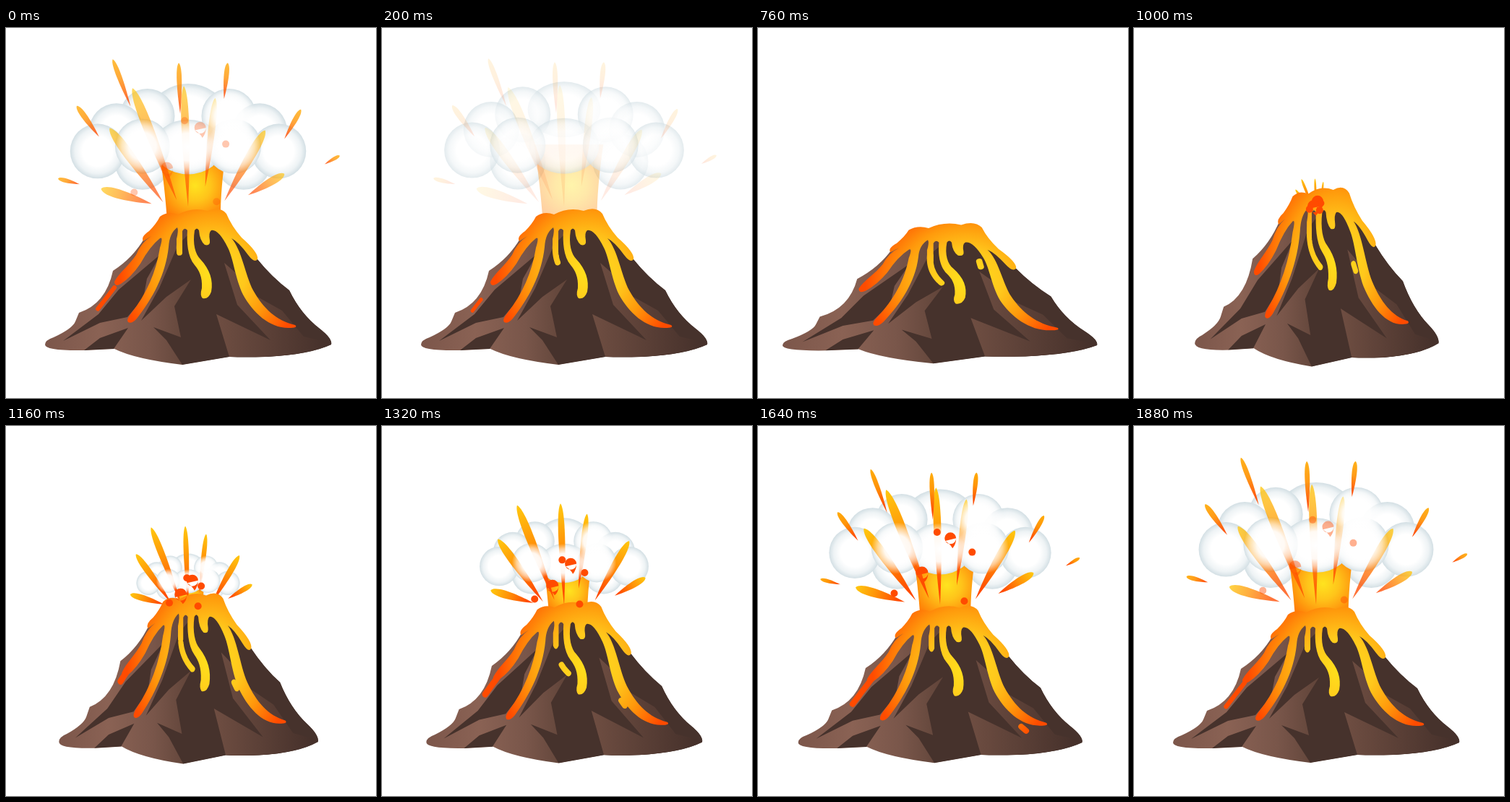
An HTML page with a canvas for the animation above (1920 ms loop, 512x512 px).

```html
<!DOCTYPE html>
<html lang="en">
<head>
<meta charset="utf-8">
<title>Volcano</title>
<style>
html, body { margin: 0; width: 100%; height: 100%; overflow: hidden; background: #fff; }
canvas { display: block; }
</style>
</head>
<body>
<canvas id="stage" width="512" height="512"></canvas>
<script>
const ctx = document.getElementById('stage').getContext('2d');
const LOOP = 1920, STEP = 40;
const CRATER = [252, 254];
const RED = '#ff4b00';

const clamp = v => Math.max(0, Math.min(1, v));
const fade = (t, from, to) => 1 - clamp((t - from) / (to - from));
const burst = (t, start, tau, power = 1) => t > start ? 1 - Math.exp(-(((t - start) / tau) ** power)) : 0;

// Linear interpolation through [time, value] pairs.
function keys(t, list) {
  if (t <= list[0][0]) return list[0][1];
  for (let i = 1; i < list.length; i++) {
    const [t0, a] = list[i - 1], [t1, b] = list[i];
    if (t <= t1) return a + (b - a) * (t - t0) / (t1 - t0);
  }
  return list[list.length - 1][1];
}

function withStops(gradient, stops) {
  stops.forEach(([at, color]) => gradient.addColorStop(at, color));
  return gradient;
}
const radial = (x, y, r, ...stops) => withStops(ctx.createRadialGradient(x, y, 0, x, y, r), stops);
const linear = (x0, y0, x1, y1, ...stops) => withStops(ctx.createLinearGradient(x0, y0, x1, y1), stops);

const outline = new Path2D(`M54 438Q54 432 66 428Q92 416 96 406L101 394Q138 382 148 336
  Q176 318 192 290L215 262L300 260L347 319Q368 345 392 363Q408 396 434 416Q452 430 450 438
  Q420 452 360 455Q330 456 309 455L244 466Q178 458 150 444L110 446Q54 447 54 438Z`);
const shade = new Path2D(`M79 433L128 396L156 362L214 313L195 347L190 374L168 400L130 408Z
  M108 446L130 429L169 415L149 444Z
  M238 300L212 360L187 405L222 372L256 348L233 385L242 428L204 414L222 432L244 466L309 455
  L460 455L460 340L348 315L282 270L258 280Z`);
const slope = new Path2D(`M291 396L366 432L320 383L302 325L325 345L346 371L382 391L412 427L451 436
  Q420 452 360 455Q330 456 309 455Z`);
const lava = new Path2D(`M190 295Q186 289 198 281Q208 271 213 261Q224 253 238 258Q258 247 279 253
  Q296 246 305 257Q312 274 326 290Q350 311 348 320Q344 326 335 314Q322 296 312 291
  C326 306 331 342 342 363C356 388 374 405 400 411Q405 415 391 415C364 415 342 394 328 369
  C317 346 315 320 307 304Q294 278 284 280Q280 283 282 294Q283 302 275 300Q268 294 267 280Q264 275 261 280
  C258 299 262 313 269 320C282 334 287 349 284 365Q280 376 272 374Q268 370 271 360
  C272 344 267 335 261 328C251 316 250 296 251 280Q247 275 244 281L244 309Q240 318 236 309L236 292
  Q239 280 237 276Q226 284 225 303C221 341 203 374 181 402Q174 410 169 407Q166 404 173 395
  C194 369 208 337 213 304Q218 288 213 291Q199 302 186 326Q173 345 159 354Q150 359 150 351
  C157 338 171 328 180 314Q187 297 201 288Z`);
const column = new Path2D('M210 160Q219 220 222 266L298 266Q298 220 307 160Z');

const lavaFill = radial(285, 338, 134, [0, '#ffe01c'], [.35, '#ffc81c'], [.62, '#ff9a0c'], [.95, RED]);
const columnFill = radial(262, 217, 56, [0, '#ffe31f'], [.4, '#ffc41a'], [1, '#ff7a05']);
const rockFill = linear(60, 0, 290, 0, [0, '#7d574b'], [.3, '#8a6254'], [.6, '#79564a'], [1, '#51392f']);
const slopeFill = linear(290, 0, 440, 0, [0, '#6f4e42'], [1, '#46312b']);

// x, y, horizontal radius
const lowSmoke = [[187, 184, 39], [331, 184, 39]];
const smoke = [[252, 111, 51], [194, 118, 39], [310, 118, 39], [150, 139, 39], [354, 139, 39],
  [123, 168, 39], [381, 168, 39]];
const frontSmoke = [[252, 162, 49], [187, 161, 39], [317, 161, 39], [310, 118, 39]];

// tip x, y, base x, y, width
const jets = [[142, 137, 217, 241, 14], [174, 81, 236, 238, 14], [246, 78, 252, 247, 11],
  [290, 95, 276, 219, 10], [360, 140, 303, 239, 13], [130, 222, 201, 243, 13], [387, 201, 336, 231, 11]];
const sparks = [[147, 42, 172, 108, 7], [97, 107, 128, 150, 8], [71, 208, 101, 216, 6],
  [239, 47, 241, 118, 7], [307, 47, 302, 97, 7], [409, 112, 386, 153, 7], [463, 176, 442, 188, 5]];

// x, y, radius, tail
const drops = [[269, 136, 8, 14], [247, 126, 5, 0], [305, 159, 5, 0], [222, 193, 8.5, 13],
  [176, 227, 5, 0], [292, 240, 5, 0]];

function aboutCrater(scale, draw) {
  if (scale <= 0) return;
  ctx.save();
  ctx.translate(...CRATER);
  ctx.scale(scale, scale);
  ctx.translate(-CRATER[0], -CRATER[1]);
  draw();
  ctx.restore();
}

function puff([x, y, rx], front) {
  ctx.save();
  ctx.translate(x, y);
  ctx.scale(rx, 39);
  ctx.fillStyle = front
    ? radial(0, 0, 1, [0, '#fff'], [.5, '#fffffff0'], [.75, '#ffffff90'], [1, '#ffffff00'])
    : radial(0, 0, 1, [0, '#fff'], [.55, '#fff'], [.82, '#eef3f5'], [1, '#d3dfe4']);
  ctx.beginPath();
  ctx.arc(0, 0, 1, 0, 7);
  ctx.fill();
  ctx.restore();
}

function flame([x0, y0, x1, y1, w], tipColor) {
  const dx = x1 - x0, dy = y1 - y0, len = Math.hypot(dx, dy);
  const nx = -dy / len * w * .86, ny = dx / len * w * .86;
  const side = (along, off) => [x0 + dx * along + nx * off, y0 + dy * along + ny * off];
  ctx.fillStyle = linear(x0, y0, x1, y1, [0, tipColor], [.4, '#ff9408'], [.85, RED]);
  ctx.beginPath();
  ctx.moveTo(x0, y0);
  ctx.bezierCurveTo(...side(.08, 1), ...side(.65, .5), x1, y1);
  ctx.bezierCurveTo(...side(.65, -.5), ...side(.08, -1), x0, y0);
  ctx.fill();
}

// Part a..b of a quadratic curve as a rounded lava stroke.
function streak([x0, y0, cx, cy, x1, y1], a, b, width) {
  a = clamp(a);
  b = clamp(b);
  if (b <= a || width <= 0) return;
  ctx.beginPath();
  for (let i = 0; i <= 12; i++) {
    const u = a + (b - a) * i / 12, v = 1 - u;
    ctx.lineTo(v * v * x0 + 2 * u * v * cx + u * u * x1, v * v * y0 + 2 * u * v * cy + u * u * y1);
  }
  ctx.lineWidth = width;
  ctx.stroke();
}

function squash(t) {
  if (t < 400) return 0;
  if (t < 700) return .099 * Math.sin((t - 400) / 300 * Math.PI / 2);
  if (t < 760) return .099;
  if (t < 1020) return .099 - .251 * (1 - Math.cos((t - 760) / 260 * Math.PI)) / 2;
  return keys(t, [[1020, -.152], [1160, -.095], [1320, -.036], [1480, -.018], [1640, -.008], [1840, 0]]);
}

function mountain(t, late) {
  const q = squash(t);
  ctx.save();
  ctx.translate(257, 449);
  ctx.scale(1 + q, 1 - q);
  ctx.translate(-257, -449);
  ctx.fillStyle = rockFill;
  ctx.fill(outline);
  ctx.save();
  ctx.clip(outline);
  ctx.fillStyle = '#46322c';
  ctx.fill(shade);
  ctx.fillStyle = slopeFill;
  ctx.fill(slope);
  ctx.restore();

  ctx.fillStyle = ctx.strokeStyle = lavaFill;
  ctx.lineCap = ctx.lineJoin = 'round';
  ctx.fill(lava);
  if (t < 1420) {
    streak([240, 300, 238, 328, 258, 346], (t - 1080) / 340,
      keys(t, [[0, .2], [400, .75], [760, .9], [1000, 1]]), 8);
  }
  streak([158, 349, 140, 372, 123, 394],
    keys(late, [[1720, 0], [1880, .15], [2320, .95], [2400, 1]]),
    keys(late, [[1000, 0], [1320, .55], [1640, .8], [1920, .88], [2320, 1]]),
    keys(late, [[1000, 9], [1700, 8], [1920, 6], [2320, 4]]));
  const u = (t - 670) / 1000;
  if (u > 0) streak([300, 300, 313, 375, 372, 422], u - .03, u + .03, 8 * fade(t, 1660, 1800));
  ctx.restore();
}

function drawDrops(late) {
  const u = clamp((late - 920) / 1100);
  const spread = 1 - (1 - u) ** 1.7;
  ctx.globalAlpha = fade(late, 1700, 2020);
  ctx.fillStyle = RED;
  for (const [bx, by, r, tail] of drops) {
    const x = CRATER[0] + (bx - CRATER[0]) * spread, y = CRATER[1] + (by - CRATER[1]) * spread;
    ctx.beginPath();
    ctx.arc(x, y, r, 0, 7);
    if (tail) {
      ctx.moveTo(x - r * .9, y + r * .45);
      ctx.quadraticCurveTo(x, y + r, x + 3, y + tail);
      ctx.quadraticCurveTo(x + r, y + r, x + r, y);
    }
    ctx.fill();
  }
}

function draw(t) {
  const late = t < 940 ? t + LOOP : t;
  const cloud = burst(late, 1020, 252);
  const cloudAlpha = fade(late, 1920, 2470);
  const puffs = (list, front) => {
    ctx.globalAlpha = cloudAlpha;
    aboutCrater(cloud, () => list.forEach(p => puff(p, front)));
  };

  ctx.globalAlpha = 1;
  ctx.fillStyle = '#fff';
  ctx.fillRect(0, 0, 512, 512);

  puffs(lowSmoke);
  ctx.globalAlpha = fade(late, 1920, 2240);
  ctx.fillStyle = columnFill;
  aboutCrater(cloud, () => ctx.fill(column));
  puffs(smoke);
  puffs(frontSmoke.slice(0, 3));

  ctx.globalAlpha = fade(late, 1800, 2160);
  aboutCrater(burst(late, 945, 200, .93), () => jets.forEach(j => flame(j, '#ffc80f')));
  puffs(frontSmoke, true);

  ctx.globalAlpha = 1;
  mountain(t, late);

  ctx.globalAlpha = fade(late, 1860, 2160);
  aboutCrater(burst(late, 1380, 105), () => sparks.forEach(s => flame(s, '#ffad0a')));
  drawDrops(late);
}

function tick(now) {
  draw(Math.floor(now % LOOP / STEP) * STEP);
  requestAnimationFrame(tick);
}
const start = performance.now();
draw(0);
requestAnimationFrame(function run(now) {
  tickFrom(now);
  requestAnimationFrame(run);
});
function tickFrom(now) {
  draw(Math.floor(Math.max(0, now - start) % LOOP / STEP) * STEP);
}
</script>
</body>
</html>
```
